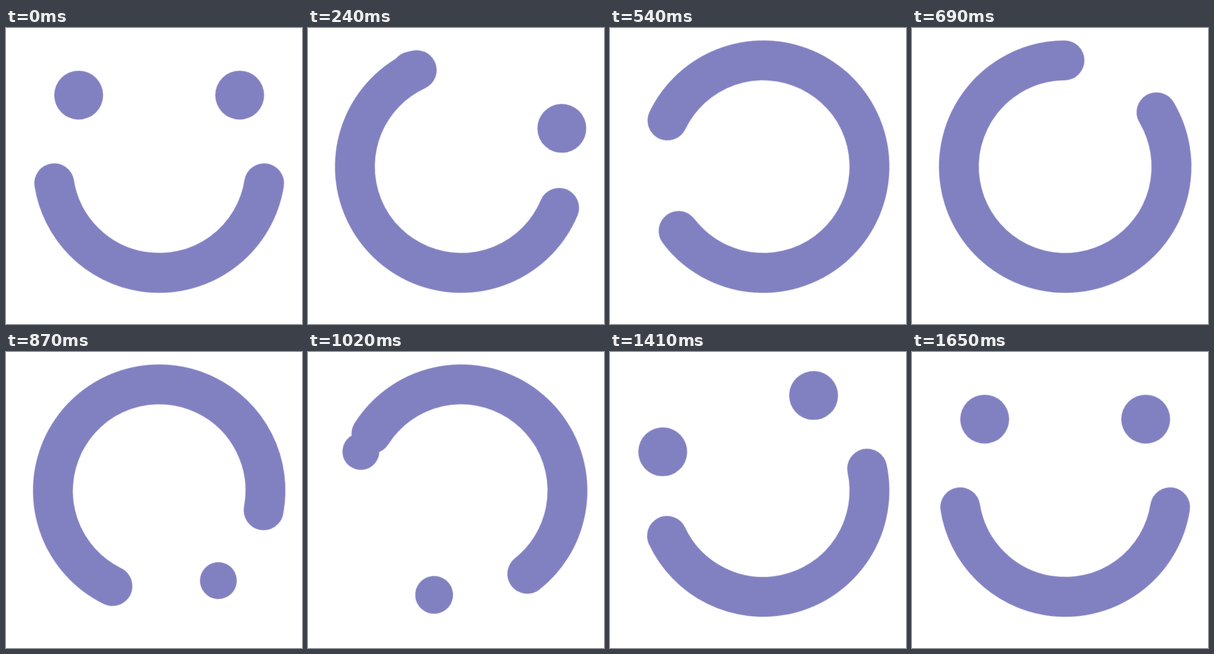
An HTML page without scripts that plays this animation: 500x500 px, repeating every 1.89 s.

```html
<!DOCTYPE html>
<html lang="en">
<head>
<meta charset="utf-8">
<title>Smile spinner</title>
<style>
  html, body { margin: 0; width: 100%; height: 100%; overflow: hidden; background: #fff; }
  svg { display: block; width: 100%; height: 100%; }

  .face, .mouth, .eye {
    animation: 1890ms cubic-bezier(.3333, 0, .6667, 1) infinite;
  }
  .face { animation-name: spin; }
  .eye { fill: #8181c2; r: 41.3px; }
  .left { animation-name: left; }
  .right { animation-name: right; }
  .mouth {
    fill: none;
    stroke: #8181c2;
    stroke-width: 67.3;
    stroke-linecap: round;
    animation-name: tail, stretch;
  }

  @keyframes spin {
    0% { transform: rotate(0deg); }
    87.302%, 100% { transform: rotate(360deg); }
  }

  /* Where the mouth begins, relative to the face */
  @keyframes tail {
    0% { transform: rotate(9deg); animation-timing-function: cubic-bezier(.3333, 0, .6667, 2.127); }
    12.698% { transform: rotate(1.9deg); animation-timing-function: cubic-bezier(.3333, .089, .6667, .565); }
    28.571% { transform: rotate(114.5deg); animation-timing-function: cubic-bezier(.3333, .325, .6667, .715); }
    46.032% { transform: rotate(280.6deg); animation-timing-function: cubic-bezier(.3333, .582, .6667, .838); }
    61.905% { transform: rotate(354.5deg); animation-timing-function: cubic-bezier(.3333, .686, .6667, .966); }
    74.603% { transform: rotate(368.5deg); animation-timing-function: cubic-bezier(.3333, .96, .6667, 1); }
    87.302%, 100% { transform: rotate(369deg); }
  }

  /* How many degrees the mouth spans */
  @keyframes stretch {
    0% { stroke-dasharray: 162px 720px; animation-timing-function: cubic-bezier(.3333, 0, .6667, .486); }
    12.698% { stroke-dasharray: 222.1px 720px; animation-timing-function: cubic-bezier(.3333, .516, .6667, .805); }
    28.571% { stroke-dasharray: 296.9px 720px; animation-timing-function: cubic-bezier(.3333, -.383, .6667, -.076); }
    46.032% { stroke-dasharray: 255px 720px; animation-timing-function: cubic-bezier(.3333, .493, .6667, .952); }
    61.905% { stroke-dasharray: 171.8px 720px; animation-timing-function: cubic-bezier(.3333, .64, .6667, .68); }
    74.603% { stroke-dasharray: 166.8px 720px; animation-timing-function: cubic-bezier(.3333, .333, .6667, 1); }
    87.302%, 100% { stroke-dasharray: 162px 720px; }
  }

  /* Eyes shrink to hide under the mouth, then grow back */
  @keyframes left {
    0%, 9.524% { r: 41.3px; }
    14.286%, 53.175% { r: 31.1px; }
    57.937%, 100% { r: 41.3px; }
  }
  @keyframes right {
    0%, 17.46% { r: 41.3px; }
    22.222%, 61.905% { r: 31.1px; }
    66.667%, 100% { r: 41.3px; }
  }
</style>
</head>
<body>
<svg viewBox="0 0 500 500">
  <g transform="translate(258.75 234.2)">
    <g class="face">
      <circle class="eye left" cx="-136" cy="-120.8" r="41.3"/>
      <circle class="eye right" cx="136" cy="-120.8" r="41.3"/>
      <circle class="mouth" r="179.5" pathLength="360" stroke-dasharray="162 720"/>
    </g>
  </g>
</svg>
</body>
</html>
```
